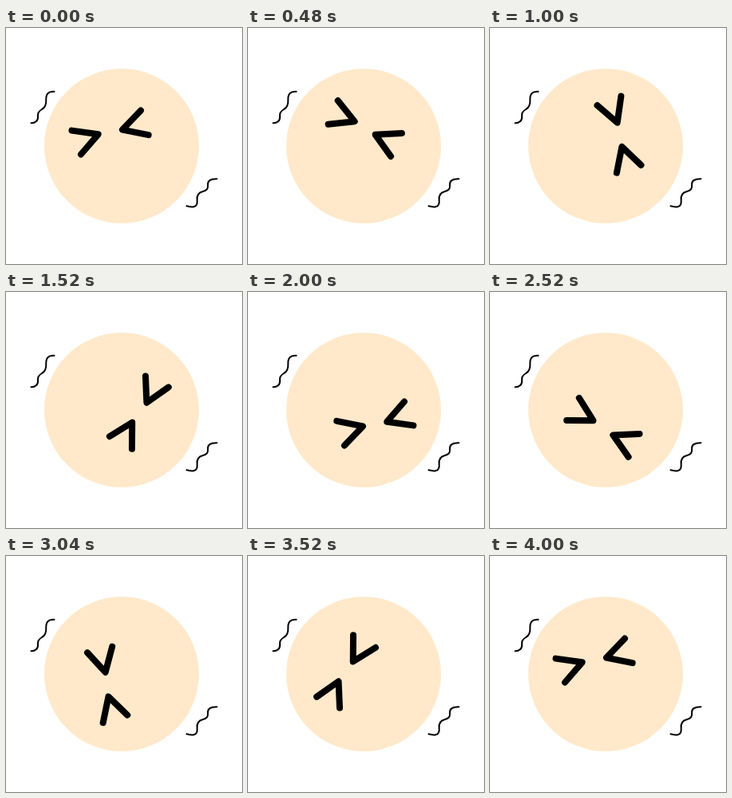
An HTML page for the animation above (4040 ms loop, 296x296 px).

```html
<!DOCTYPE html>
<html lang="en">
<head>
<meta charset="utf-8">
<title>Dizzy face</title>
<style>
  html, body { margin: 0; height: 100%; overflow: hidden; background: #fff; }
  svg { display: block; width: 100vw; height: 100vh; }
  path { fill: none; stroke: #000; stroke-linecap: round; stroke-linejoin: round; }
</style>
</head>
<body>
<svg viewBox="0 0 296 296">
  <circle cx="145" cy="148" r="97" fill="#ffe9ca"/>
  <g stroke-width="2">
    <path stroke-width="2" d="M60.5 79.8C53 79 50 83 50.3 90C50.6 96 49 100 45 102C40.5 104.5 39.5 107 40 111C40.5 116 37 119.3 31.5 119.3"/>
    <path stroke-width="2" d="M264.5 189.2C256 189 252.6 192 253.2 197C253.8 202 251.5 204 247 205C241 206.5 239 210 239.7 216C240.6 224 236 226 226.5 223.3"/>
  </g>
  <!-- Eyes are drawn around the middle of the face -->
  <path id="eyes" stroke-width="8" d="M-62.5 -19.4L-29.3 -14.7L-51 10.5M24 -44.5L1 -20.4L33.7 -13.9"/>
</svg>
<script>
  const STEP = 40, STEPS = 101;
  const eyes = document.getElementById('eyes');

  // One clockwise turn in even steps; the last step rests on the start pose.
  function draw() {
    const step = Math.floor(performance.now() / STEP) % STEPS;
    const angle = step * 360 / (STEPS - 1);
    eyes.setAttribute('transform', `translate(145 148) rotate(${angle})`);
    requestAnimationFrame(draw);
  }
  draw();
</script>
</body>
</html>
```
